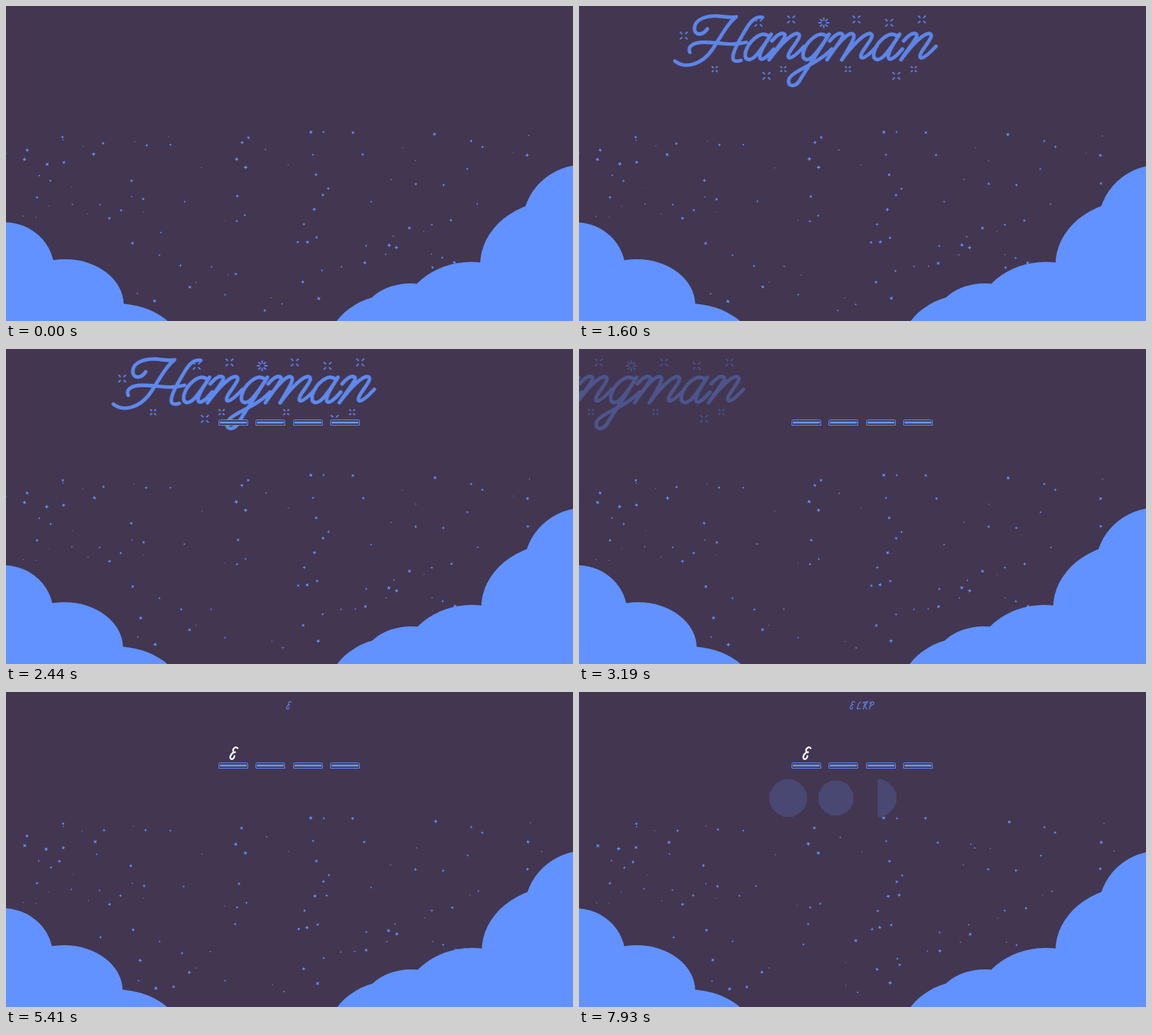
Write an HTML page with a canvas that moves like this. It is 843 px wide and 469 px high and loops after 7.99 s.

```html
<!DOCTYPE html>
<html lang="en">
<head>
<meta charset="utf-8">
<title>Hangman</title>
<style>
  html, body { margin: 0; width: 100%; height: 100%; overflow: hidden; background: #433650; }
  canvas { display: block; }
</style>
</head>
<body>
<canvas id="stage" width="843" height="469" role="img" aria-label="Hangman"></canvas>
<script>
const ctx = document.getElementById('stage').getContext('2d');
const W = 843, H = 469, LOOP = 7990;
const NIGHT = '#433650', BLUE = '#6192ff';

let seed = 7;
const random = () => (seed = (seed * 16807) % 2147483647) / 2147483647;

// Stars drift along the diagonal; some of them are born or die on the way.
const stars = Array.from({ length: 150 }, (_, i) => {
  const change = random() * 8;
  return {
    x: random() * W,
    y: 187 + random() * 268,
    drift: (random() - 0.4) * 0.8,
    size: 0.9 + random() * 2.6,
    turn: random() * 1.6,
    from: i % 6 === 0 ? change : -1,
    to: i % 6 === 1 ? change : 99
  };
});

function drawStars(t) {
  const s = t / 1000;
  ctx.fillStyle = BLUE;
  for (const star of stars) {
    const grow = Math.min(1, (s - star.from) * 2, (star.to - s) * 2);
    if (grow <= 0) continue;
    ctx.save();
    ctx.translate(star.x + star.drift * s, star.y + star.drift * s);
    if (star.size > 2.6) ctx.rotate(star.turn + star.drift * s);
    ctx.beginPath();
    for (let k = 0; k < 8; k++) {
      const a = k * Math.PI / 4, d = star.size * grow * (k % 2 ? 0.38 : 1);
      ctx.lineTo(Math.cos(a) * d, Math.sin(a) * d);
    }
    ctx.fill();
    ctx.restore();
  }
}

// Each puff: centre x, centre y, radius x, radius y.
const puffs = [
  [-2, 394, 74, 72], [88, 445, 87, 68], [165, 515, 98, 72],
  [860, 325, 92, 89], [822, 385, 117, 96], [692, 470, 105, 89], [601, 473, 75, 60], [574, 520, 100, 90]
];
function drawClouds(t) {
  const sway = (1 - Math.cos(t * 2 * Math.PI / 3200)) / 2;
  ctx.fillStyle = BLUE;
  for (const [cx, cy, rx, ry] of puffs) {
    const reach = (530 - (cy - ry)) / 70;  // higher puffs sway further
    const x = cx + Math.sign(cx - W / 2) * reach * sway;
    ctx.beginPath();
    ctx.ellipse(x, cy, rx, ry, 0, Math.PI, 0);
    ctx.lineTo(x + rx, H + 60);
    ctx.lineTo(x - rx, H + 60);
    ctx.fill();
  }
}

// Script lettering: strokes shared between the letters.
const bowl = 'M35 44C24 36 6 54 2 68C-1 82 9 83 18 73C26 64 34 52 40 42';
const stem = 'M4 52C10 45 18 38 23 42C26 46 16 56 0 80';
const finish = 'M0 80C16 58 34 40 42 41C50 43 40 54 32 66C24 78 28 86 52 60';
const middle = 'M0 80C14 58 30 40 37 41C45 43 36 56 22 80';
const letters = {
  H: 'M22 34C15 45 2 44 3 32C4 20 20 14 38 15C50 16 58 18 65 16' +
     'C52 26 42 46 30 64C14 88 -12 94 -26 82' +
     'M-4 69C-8 60 2 54 16 54C40 54 56 60 80 54' +
     'M104 17C91 14 83 28 75 42C63 62 50 88 72 81',
  a: bowl + 'C32 55 23 67 23 75C23 83 32 79 44 64',
  n: stem + finish,
  g: bowl + 'C24 68 8 92 -2 108C-8 121 -22 122 -20 110C-16 96 22 88 44 64'
};
const titleLayer = document.createElement('canvas');
titleLayer.width = 420;
titleLayer.height = 130;

function paintTitle() {
  const g = titleLayer.getContext('2d');
  const write = (d, x) => {
    g.save();
    g.translate(x, 0);
    g.stroke(new Path2D(d));
    g.restore();
  };
  const sparkle = (x, y, r, rays) => {
    for (let k = 0; k < rays; k++) {
      const a = Math.PI / 4 + k * 2 * Math.PI / rays;
      g.beginPath();
      g.moveTo(x + Math.cos(a) * r * 0.4, y + Math.sin(a) * r * 0.4);
      g.lineTo(x + Math.cos(a) * r, y + Math.sin(a) * r);
      g.stroke();
    }
  };
  g.translate(40, 0);
  g.strokeStyle = BLUE;
  g.lineCap = g.lineJoin = 'round';
  g.lineWidth = 5.4;
  write(letters.H, 0);
  write(letters.a, 77);
  write(letters.n, 114);
  write(letters.g, 163);
  write(stem + middle, 200);
  write(finish, 222);
  write(letters.a, 268);
  write(letters.n, 310);

  g.lineCap = 'butt';
  g.lineWidth = 2;
  for (let i = 0; i < 6; i++) sparkle(98 + i * 48.6, i % 2 ? 20 : 25, 8, i === 2 ? 8 : 4);
  for (const x of [33, 135, 231, 329]) sparkle(x, 94, 6, 4);
  for (const x of [110, 303]) sparkle(x, 104, 8, 4);
  sparkle(-13, 44, 8, 4);
}
paintTitle();

function drawTitle(t) {
  const away = (t - 2050) / 1885;
  if (Math.abs(away) >= 1) return;
  const shown = Math.cos(away * Math.PI / 2) ** 2;
  ctx.globalAlpha = shown;
  ctx.drawImage(titleLayer, 201 - 541 * (1 - shown), 0);
  ctx.globalAlpha = 1;
}

function drawSlots() {
  for (let i = 0; i < 4; i++) {
    const x = Math.round(316 + i * 55.4);
    ctx.fillStyle = NIGHT;
    ctx.fillRect(x, 105, 44, 9);
    ctx.strokeStyle = ctx.fillStyle = BLUE;
    ctx.lineWidth = 1;
    ctx.beginPath();
    ctx.roundRect(x + 0.5, 105.5, 43, 8, [2, 2, 0, 0]);
    ctx.stroke();
    ctx.fillRect(x + 2, 108, 40, 3);
  }
}

// Handwritten E, L, K, P and the time each one is guessed.
const guesses = [
  { at: 4800, d: 'M12 3C10 -1 4 3 5 7C5 10 8 10 8 9C3 9 -1 16 1 19C3 22 7 18 7 15' },
  { at: 6150, d: 'M11 2C6 3 5 12 2 19C5 18 7 18 10 19' },
  { at: 6850, d: 'M7 2L2 20M1 5C4 1 8 4 13 1C11 6 8 9 6 10L10 20' },
  { at: 7480, d: 'M7 2L1 20M2 5C8 -1 16 2 11 8C9 11 6 11 4 10' }
].map(({ at, d }) => ({ at, path: new Path2D(d) }));

function drawLetter(path, x, y, scale, color) {
  ctx.save();
  ctx.translate(x, y);
  ctx.scale(scale, scale);
  ctx.strokeStyle = color;
  ctx.lineWidth = 2.5;
  ctx.lineCap = ctx.lineJoin = 'round';
  ctx.stroke(path);
  ctx.restore();
}

function drawGuesses(t) {
  const made = guesses.filter(g => t >= g.at);
  ctx.globalAlpha = 0.75;
  made.forEach((g, i) => drawLetter(g.path, 421.5 + (i - made.length / 2) * 9.4, 13.5, 0.6, BLUE));
  ctx.globalAlpha = 1;
  if (t >= 5130) drawLetter(guesses[0].path, 333, 81, 0.95, '#fff');
}

function pixelDisc(cx, r, rightHalf) {
  const step = 2;
  for (let y = -r; y < r; y += step) {
    const half = Math.round(Math.sqrt(r * r - (y + step / 2) ** 2) / step) * step;
    ctx.fillRect(rightHalf ? cx : cx - half, 158 + y, rightHalf ? half : half * 2, step);
  }
}

function drawMoons(t) {
  ctx.globalAlpha = 0.2;
  ctx.fillStyle = BLUE;
  if (t >= guesses[1].at) pixelDisc(311, 28);
  if (t >= guesses[2].at) pixelDisc(382, 26);
  if (t >= guesses[3].at) pixelDisc(444, 28, true);
  ctx.globalAlpha = 1;
}

function draw(t) {
  ctx.fillStyle = NIGHT;
  ctx.fillRect(0, 0, W, H);
  drawStars(t);
  drawClouds(t);
  drawTitle(t);
  if (t >= 1740) drawSlots();
  drawGuesses(t);
  drawMoons(t);
}

const start = performance.now();
function tick() {
  draw((performance.now() - start) % LOOP);
  requestAnimationFrame(tick);
}
tick();
</script>
</body>
</html>
```
